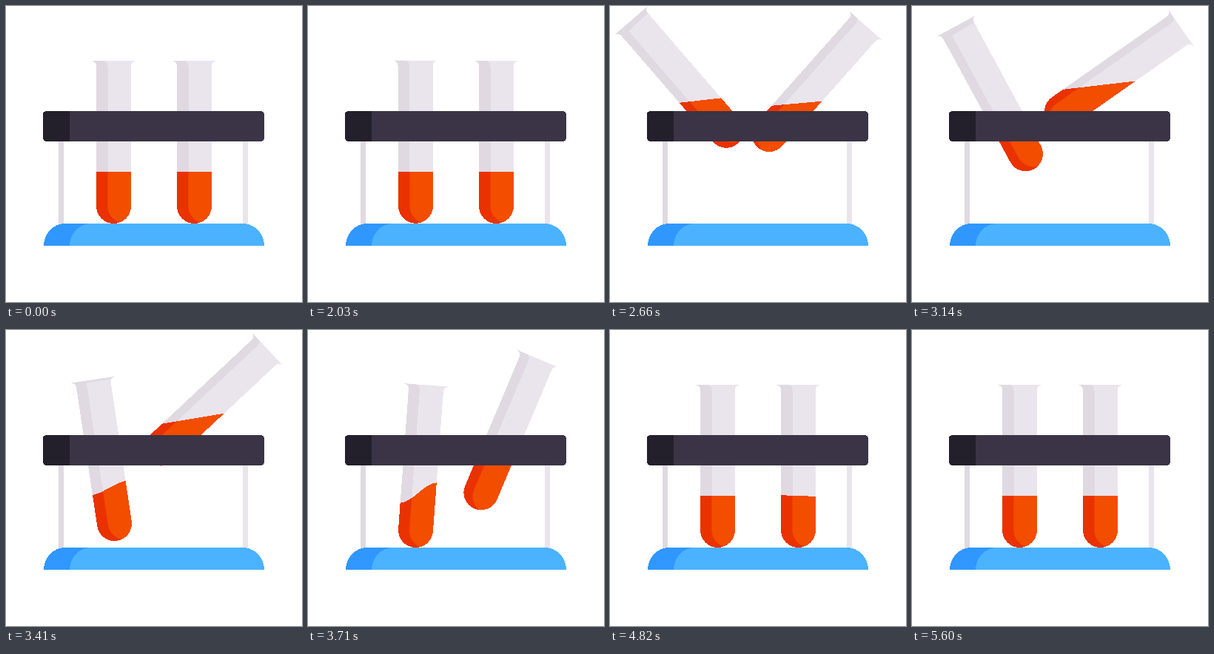
Write an HTML page that moves like this. It is 400 px wide and 400 px high and loops after 5630 ms.

```html
<!DOCTYPE html>
<html lang="en">
<head>
<meta charset="utf-8">
<title>Test tubes</title>
<style>
  html, body { margin: 0; width: 100%; height: 100%; overflow: hidden; background: #fff; }
  svg { display: block; width: 100vw; height: 100vh; shape-rendering: crispEdges; }
  .glass { fill: #eae5ec; }
  .shade { fill: #e0d9e2; }
  .liquid { fill: #f34d00; }
  .deep { fill: #ea3200; }
</style>
</head>
<body>
<svg viewBox="0 0 400 400">
  <defs>
    <path id="body" d="M-30.5-196.5H30.5C25.5-196 23.5-193.5 23.5-189V0A23.5 23.5 0 0 1-23.5 0V-189C-23.5-193.5-25.5-196-30.5-196.5Z"/>
    <clipPath id="inBody"><use href="#body"/></clipPath>
  </defs>

  <rect class="shade" x="71" y="180" width="7" height="116"/>
  <rect class="glass" x="320" y="180" width="7" height="116"/>
  <g id="tubes"></g>

  <path fill="#4bb2ff" d="M51 324A29 30 0 0 1 80 294H320A29 30 0 0 1 349 324Z"/>
  <path fill="#2f97ff" d="M51 324A29 30 0 0 1 80 294H115A29 30 0 0 0 86 324Z"/>
  <rect fill="#3a3446" x="50" y="142" width="299" height="41" rx="4.5"/>
  <path fill="#231f2b" d="M54.5 142H86V183H54.5A4.5 4.5 0 0 1 50 178.5V146.5A4.5 4.5 0 0 1 54.5 142Z"/>
</svg>
<script>
const LOOP = 5630, R = 23.5, LEVEL = 46.3;

// Times: start, peak of the jump, landing, end of the back swing.
// Sizes at the peak: lean, dx, dy and swell (surface rise, left to right wall).
const TUBES = [
  { x: 145.5, start: 2030, peak: 2790, land: 3446, rest: 3750,
    lean: -42.3, back: 4.4, dx: 12, dy: -106, swell: -34.5 },
  { x: 254.5, start: 2060, peak: 3160, land: 3904, rest: 4200,
    lean: 55, back: -3.8, dx: -52, dy: -128, swell: 87 }
];

const unit = (t, a, b) => Math.min(1, Math.max(0, (t - a) / (b - a)));
const ease = u => (1 - Math.cos(Math.PI * u)) / 2;
const mix = (a, b, u) => a + (b - a) * u;

function pose(m, t) {
  const rise = Math.sin(Math.PI / 2 * unit(t, m.start, m.peak));
  const lift = rise * Math.cos(Math.PI / 2 * unit(t, m.peak, m.land));
  const swing = ease(unit(t, m.peak, m.rest));
  const after = Math.max(0, t - m.rest);
  const wave = 31 * Math.sign(m.back) * Math.exp(-after / 200) * Math.cos(2 * Math.PI * after / 660);
  return {
    x: m.x + m.dx * lift,
    y: 270.5 + m.dy * lift,
    tilt: mix(m.lean * rise, m.back * (1 - ease(after < 260 ? after / 260 : 1)), swing),
    slosh: mix(m.swell * rise * rise, wave, swing)
  };
}

function add(parent, tag, attrs) {
  const el = document.createElementNS("http://www.w3.org/2000/svg", tag);
  for (const name in attrs) el.setAttribute(name, attrs[name]);
  return parent.appendChild(el);
}

function makeTube(motion, i) {
  const g = add(document.getElementById("tubes"), "g", {});
  const clip = add(add(g, "clipPath", { id: "side" + i }), "path", {});
  add(g, "use", { href: "#body", class: "glass" });
  const side = add(g, "path", { class: "shade" , "clip-path": "url(#inBody)" });
  const lip = add(g, "path", { class: "shade", "clip-path": "url(#inBody)" });
  const liquid = add(g, "path", { class: "liquid" });
  const deep = add(g, "path", { class: "deep", "clip-path": `url(#side${i})` });

  return t => {
    const { x, y, tilt, slosh } = pose(motion, t);
    const lean = Math.sin(Math.abs(tilt) * Math.PI / 180);
    g.setAttribute("transform", `translate(${x} ${y}) rotate(${tilt})`);

    // Shaded side: the part outside the same tube moved right by w
    const w = 15.5 - 6 * lean, edge = w - R;
    const shape = `M-31-197H${edge - 7}Q${edge}-196 ${edge}-189V0`
      + `A${R} ${R} 0 0 0 ${w / 2} ${Math.sqrt(R * R - w * w / 4)}A${R} ${R} 0 0 1 ${-R} 0V-180H-31Z`;
    side.setAttribute("d", shape);
    clip.setAttribute("d", shape);

    // The rim shows its inside when leaning left
    const depth = 8 * Math.min(1, Math.max(0, -tilt / 25));
    lip.setAttribute("d", `M-31-197H31V${-196.5 + depth * 0.9}L-17 ${-196.5 + depth * 1.1}H-31Z`);

    // Surface is straight in a strong lean and S-shaped when upright
    const mid = LEVEL + 0.13 * Math.abs(slosh) + 5 * lean;
    const left = slosh / 2 - mid, right = -slosh / 2 - mid;
    const bend = slosh / 3 * Math.min(1, Math.abs(tilt) / 30);
    const d = `M${-R} ${left}C-7 ${left - bend} 7 ${right + bend} ${R} ${right}V0A${R} ${R} 0 0 1 ${-R} 0Z`;
    liquid.setAttribute("d", d);
    deep.setAttribute("d", d);
  };
}

const tubes = TUBES.map(makeTube);

function draw() {
  const t = performance.now() % LOOP;
  tubes.forEach(update => update(t));
  requestAnimationFrame(draw);
}
draw();
</script>
</body>
</html>
```
